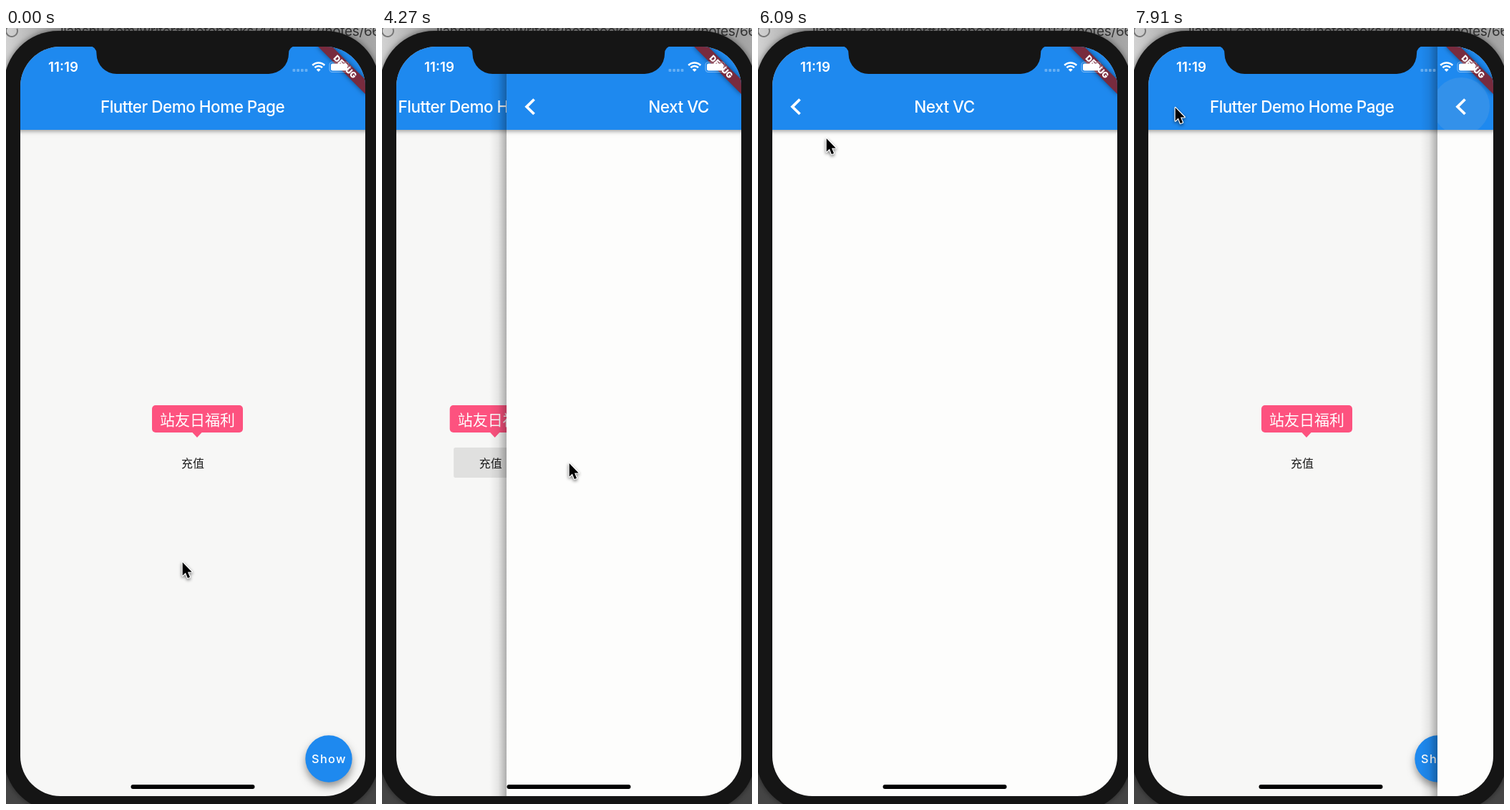
An HTML page with a canvas for the animation above (8000 ms loop, 517 px wide and 1082 px high).

```html
<!DOCTYPE html>
<html lang="zh-CN">
<head>
<meta charset="utf-8">
<style>
html, body { margin: 0; width: 517px; height: 1082px; overflow: hidden; background: #151515; }
canvas { display: block; }
</style>
</head>
<body>
<canvas id="stage" width="517" height="1082"></canvas>
<script>
const ctx = document.getElementById('stage').getContext('2d');
const LOOP = 8000;
const SCREEN = { x: 20, y: 26, w: 482, h: 1045, r: 56 };
const BLUE = '#1e89ef';
const LATIN = 'Inter, sans-serif';
const HAN = '"Noto Sans CJK SC", "Noto Sans CJK", sans-serif';

const clamp = v => Math.max(0, Math.min(1, v));
const progress = (t, from, to) => clamp((t - from) / (to - from));
const smooth = p => p * p * (3 - 2 * p);

// Cubic easing with control points (.35,.91) and (.33,.97)
function slideEase(x) {
  if (x <= 0 || x >= 1) return clamp(x);
  const bez = (a, b, s) => 3 * (1 - s) ** 2 * s * a + 3 * (1 - s) * s * s * b + s ** 3;
  let lo = 0, hi = 1;
  for (let i = 0; i < 24; i++) {
    const mid = (lo + hi) / 2;
    if (bez(.35, .33, mid) < x) lo = mid; else hi = mid;
  }
  return bez(.91, .97, lo);
}

// Pointer path: time, x, y
const pointerPath = [
  [0, 246, 744], [1700, 246, 744], [2600, 261, 606], [5100, 261, 606],
  [5810, 125, 228], [6090, 95, 153], [6560, 57, 110], [LOOP, 57, 110]
];

function pointerAt(t) {
  const i = pointerPath.findIndex((k, n) => n && t <= k[0]);
  const a = pointerPath[i - 1], b = pointerPath[i];
  const p = smooth(progress(t, a[0], b[0]));
  return [a[1] + (b[1] - a[1]) * p, a[2] + (b[2] - a[2]) * p];
}

function roundRect(x, y, w, h, r, fill) {
  ctx.beginPath();
  ctx.roundRect(x, y, w, h, r);
  ctx.fillStyle = fill;
  ctx.fill();
}

function circle(x, y, r, fill) {
  ctx.beginPath();
  ctx.arc(x, y, r, 0, Math.PI * 2);
  ctx.fillStyle = fill;
  ctx.fill();
}

function polygon(points, fill) {
  ctx.beginPath();
  points.forEach(([x, y]) => ctx.lineTo(x, y));
  ctx.closePath();
  ctx.fillStyle = fill;
  ctx.fill();
}

function label(text, x, y, font, color = '#fff', spacing = 0, align = 'center') {
  ctx.font = font;
  ctx.fillStyle = color;
  ctx.textAlign = align;
  ctx.letterSpacing = spacing + 'px';
  ctx.fillText(text, x, y);
  ctx.letterSpacing = '0px';
}

function shadow(color, blur, dy) {
  ctx.shadowColor = color;
  ctx.shadowBlur = blur;
  ctx.shadowOffsetY = dy;
}

function gradient(x0, y0, x1, y1, ...colors) {
  const g = ctx.createLinearGradient(x0, y0, x1, y1);
  colors.forEach((c, i) => g.addColorStop(i / (colors.length - 1), c));
  return g;
}

function drawDesktop() {
  ctx.fillStyle = gradient(0, 0, 517, 0, '#d2d2d2', '#777', '#858585', '#858585', '#a8a8a8');
  ctx.fillRect(0, 0, 517, 100);
  ctx.fillStyle = '#454545';
  ctx.fillRect(0, 980, 517, 102);
  ctx.strokeStyle = '#777';
  ctx.lineWidth = 2;
  ctx.beginPath();
  ctx.arc(8, 4, 8, -.4, 5);
  ctx.stroke();
  label('jianshu.com/writer#/notebooks/44970122/notes/66', 76, 11,
    `19px ${LATIN}`, '#333', -.35, 'left');
}

function drawBody() {
  ctx.save();
  shadow('rgba(0,0,0,.5)', 8, 0);
  roundRect(-3, 4, 525, 1088, 76, '#151515');
  ctx.restore();
}

function clipScreen() {
  ctx.beginPath();
  ctx.roundRect(SCREEN.x, SCREEN.y, SCREEN.w, SCREEN.h, SCREEN.r);
  ctx.clip();
}

function drawPage(background, title) {
  ctx.fillStyle = background;
  ctx.fillRect(20, 26, 482, 1045);
  ctx.save();
  ctx.beginPath();
  ctx.rect(20, 26, 482, 1045);
  ctx.clip();
  shadow('rgba(0,0,0,.38)', 6, 2);
  ctx.fillStyle = BLUE;
  ctx.fillRect(14, 20, 494, 122);
  ctx.restore();
  label(title, 260.5, 118, `500 22.5px ${LATIN}`, '#fff', -.5);
}

function drawHome(t) {
  drawPage('#f7f7f6', 'Flutter Demo Home Page');
  const press = t < 5000 ? progress(t, 3900, 4020) : 0;
  if (press) roundRect(209.5, 585, 103, 42, 2.5, `rgba(188,188,188,${.4 * press})`);
  label('充值', 261, 613, `500 16px ${HAN}`, '#1d1d1d');
  roundRect(204, 526, 127, 38, 5, '#fd527f');
  polygon([[260, 563.5], [274, 563.5], [267, 571]], '#fd527f');
  label('站友日福利', 267.5, 554, `300 21px ${HAN}`);
  ctx.save();
  shadow('rgba(0,0,0,.4)', 11, 6);
  circle(451, 1019, 32.7, BLUE);
  ctx.restore();
  label('Show', 451.5, 1025, `500 16.3px ${LATIN}`, '#fff', 1.4);
}

function drawNext(t) {
  ctx.fillStyle = gradient(-4, 0, 20, 0, 'rgba(0,0,0,0)', 'rgba(0,0,0,.07)', 'rgba(0,0,0,.3)');
  ctx.fillRect(-4, 26, 24, 1045);
  drawPage('#fdfdfc', 'Next VC');
  if (t > 7400) {
    ctx.save();
    ctx.beginPath();
    ctx.rect(20, 26, 482, 116);
    ctx.clip();
    const grow = progress(t, 7400, 7620);
    const fade = 1 - .62 * progress(t, 7620, 7910);
    circle(53, 109, 12 + 26 * grow + 2 * progress(t, 7620, 7910),
      `rgba(200,200,200,${.33 * Math.min(1, grow * 2) * fade})`);
    ctx.restore();
  }
  ctx.strokeStyle = '#fff';
  ctx.lineWidth = 3.8;
  ctx.beginPath();
  ctx.moveTo(58.5, 99.5);
  ctx.lineTo(48, 109.8);
  ctx.lineTo(58.5, 120);
  ctx.stroke();
}

function drawBanner() {
  ctx.save();
  ctx.translate(502, 26);
  ctx.rotate(Math.PI / 4);
  shadow('rgba(0,0,0,.5)', 7, 0);
  ctx.fillStyle = '#782b3e';
  ctx.fillRect(-47, 32.6, 94, 14);
  ctx.shadowColor = 'transparent';
  label('DEBUG', 0, 43.8, `900 11.6px ${LATIN}`);
  ctx.restore();
}

function drawStatus() {
  label('11:19', 80, 61, `600 18.8px ${LATIN}`);
  for (let i = 0; i < 4; i++) {
    roundRect(400.5 + i * 5.7, 57, 3.8, 4, 1, 'rgba(255,255,255,.32)');
  }
  ctx.strokeStyle = '#fff';
  ctx.lineWidth = 2.7;
  for (const r of [12, 7.5]) {
    ctx.beginPath();
    ctx.arc(436.7, 60.5, r, -Math.PI * .75, -Math.PI * .25);
    ctx.stroke();
  }
  ctx.beginPath();
  ctx.moveTo(436.7, 61);
  ctx.arc(436.7, 61, 4.2, -Math.PI * .75, -Math.PI * .25);
  ctx.fillStyle = '#fff';
  ctx.fill();
  ctx.strokeStyle = 'rgba(255,255,255,.4)';
  ctx.lineWidth = 1.1;
  ctx.beginPath();
  ctx.roundRect(452, 47.5, 27, 14, 4);
  ctx.stroke();
  roundRect(454, 49.5, 23, 10, 2.3, '#fff');
  roundRect(480.5, 52.5, 1.6, 4.5, 1, 'rgba(255,255,255,.5)');
}

function drawNotch() {
  ctx.beginPath();
  ctx.moveTo(116, 25);
  ctx.quadraticCurveTo(126.5, 26, 126.5, 36);
  ctx.arcTo(127, 64, 156, 64, 28);
  ctx.lineTo(366, 64);
  ctx.arcTo(395, 64, 395, 36, 28);
  ctx.quadraticCurveTo(395, 26, 405, 25);
  ctx.closePath();
  ctx.fillStyle = '#151515';
  ctx.fill();
}

function drawPointer(t) {
  const arrow = [[0, 0], [0, 18.5], [4.2, 14.6], [7.2, 22], [10.3, 20.7], [7.3, 13.6], [13, 13.4]];
  ctx.save();
  ctx.translate(...pointerAt(t));
  ctx.translate(.7, 1);
  shadow('rgba(0,0,0,.4)', 4, 2);
  polygon(arrow, '#fff');
  ctx.lineJoin = 'round';
  ctx.lineWidth = 2.4;
  ctx.strokeStyle = '#fff';
  ctx.stroke();
  ctx.shadowColor = 'transparent';
  polygon(arrow, '#000');
  ctx.restore();
}

function render(t) {
  const pushed = slideEase(progress(t, 4043, 4863));
  const popped = slideEase(progress(t, 7491, 8574));
  const offset = 1 - pushed + popped;

  drawDesktop();
  drawBody();
  ctx.save();
  clipScreen();
  if (offset > 0) {
    ctx.save();
    ctx.translate(-SCREEN.w * (1 - offset) / 3, 0);
    drawHome(t);
    ctx.restore();
  }
  if (offset < 1) {
    ctx.save();
    ctx.translate(SCREEN.w * offset, 0);
    drawNext(t);
    ctx.restore();
  }
  drawBanner();
  drawStatus();
  roundRect(174.5, 1055, 173, 6, 3, '#000');
  ctx.restore();
  drawNotch();
  drawPointer(t);
}

function tick() {
  render(performance.now() % LOOP);
  requestAnimationFrame(tick);
}
tick();
</script>
</body>
</html>
```
